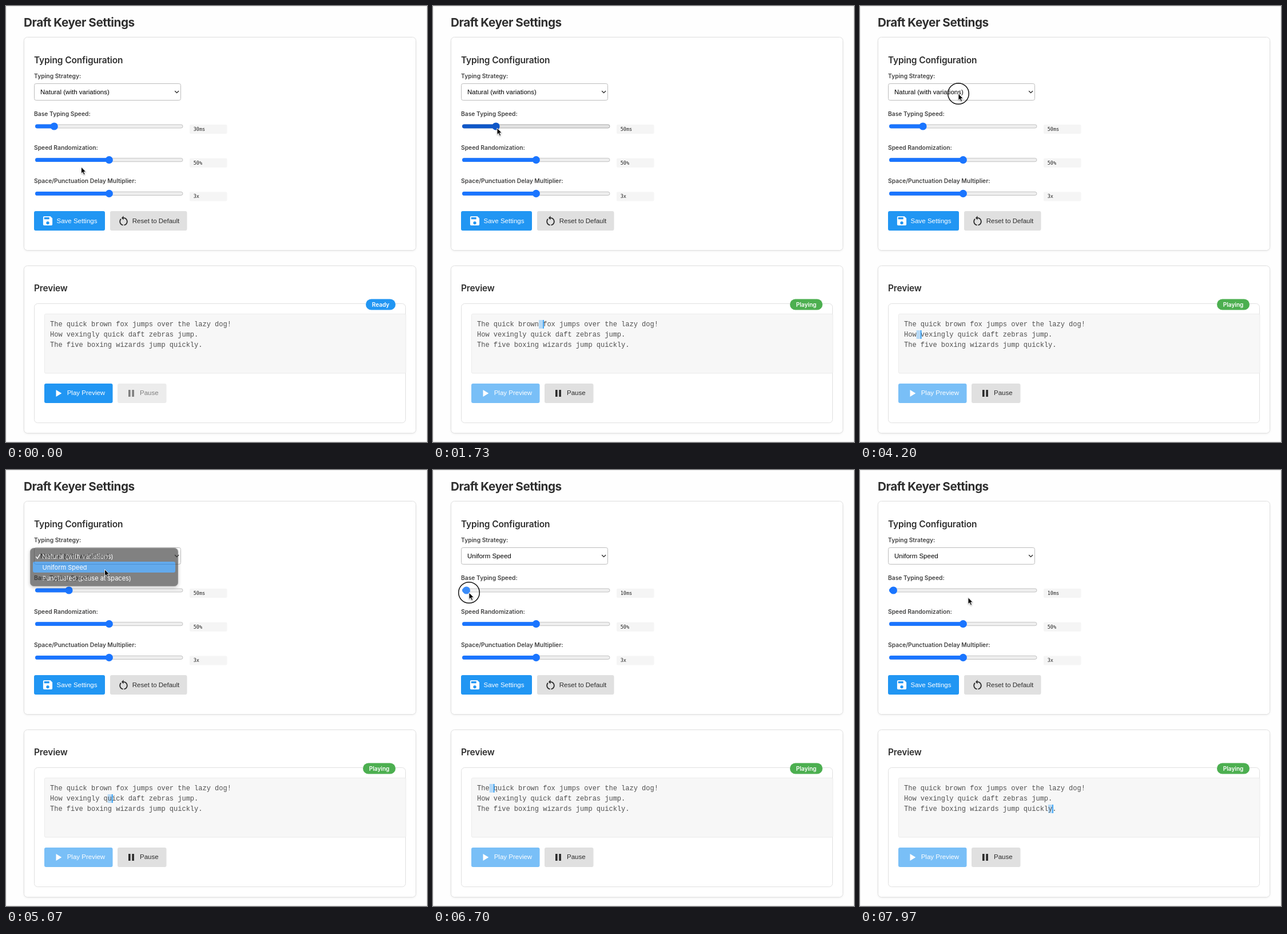
An HTML page for the animation above (8000 ms loop, 736x761 px).

```html
<!DOCTYPE html>
<html lang="en">
<head>
<meta charset="utf-8">
<title>Draft Keyer Settings</title>
<style>
html, body { margin: 0; width: 100%; height: 100%; overflow: hidden; background: #fefefe; }
svg { display: block; width: 736px; height: 761px; }
text { font-family: "Liberation Sans", Arial, sans-serif; font-size: 11.5px; white-space: pre; }
.h1, .h2, .label, .badge, .menu text { font-family: Inter, sans-serif; font-weight: 600; fill: #2f2f2f; }
.h1 { font-size: 20.7px; font-weight: 700; letter-spacing: -.45px; }
.h2 { font-size: 15.5px; letter-spacing: -.15px; }
.label { font-size: 10.3px; fill: #444; }
.badge { font-size: 10px; fill: #fff; text-anchor: middle; }
.menu text { font-size: 11px; font-weight: 400; fill: #fff; }
.value { font-family: "DejaVu Sans Mono", monospace; font-size: 8.5px; fill: #222; }
.code { font-family: "Liberation Mono", monospace; font-size: 12px; fill: #505050; }
.card { fill: #fff; stroke: #e0e0e0; }
.soft { filter: drop-shadow(0 1px 1.5px rgba(0,0,0,.07)); }
</style>
</head>
<body>
<svg viewBox="0 0 736 761">
  <rect x=".5" y=".5" width="735" height="760" fill="#fefefe" stroke="#ececec"/>
  <text class="h1" x="31" y="36">Draft Keyer Settings</text>

  <rect class="card soft" x="31.5" y="54.5" width="685" height="372" rx="6"/>
  <text class="h2" x="49" y="100">Typing Configuration</text>
  <text class="label" x="49" y="126">Typing Strategy:</text>
  <rect id="box" x="49.5" y="135.5" width="256" height="29" rx="3" fill="#fff"/>
  <text id="choice" x="60" y="154"></text>
  <path d="M295.2 148.3l3.4 3.4 3.4-3.4" fill="none" stroke="#222" stroke-width="1.3"/>
  <g id="sliders"></g>
  <rect x="49" y="358" width="124" height="34" rx="3" fill="#2196f3"/>
  <path transform="translate(62.2 364.2) scale(.9)" fill="#fff" fill-rule="evenodd"
    d="M17 3H5a2 2 0 0 0-2 2v14a2 2 0 0 0 2 2h14a2 2 0 0 0 2-2V7zM12 19a3 3 0 1 1 0-6 3 3 0 0 1 0 6zM15 9H5V5h10z"/>
  <text x="88.5" y="379" fill="#fff">Save Settings</text>
  <rect x="182" y="358" width="134.5" height="34" rx="3" fill="#e0e0e0"/>
  <path transform="translate(194.7 364.5) scale(.9)" fill="#2b2b2b"
    d="M12 5V2L8 6l4 4V7c3.31 0 6 2.69 6 6 0 2.97-2.17 5.43-5 5.91v2.02c3.95-.49 7-3.85 7-7.93 0-4.42-3.58-8-8-8zm-6 8c0-1.65.67-3.15 1.76-4.24L6.34 7.34C4.9 8.79 4 10.79 4 13c0 4.08 3.05 7.44 7 7.93v-2.02c-2.83-.48-5-2.94-5-5.91z"/>
  <text x="220.8" y="379" fill="#2b2b2b">Reset to Default</text>

  <rect class="card soft" x="31.5" y="453.5" width="685" height="292" rx="6"/>
  <text class="h2" x="49" y="498">Preview</text>
  <rect class="card" x="49.5" y="519.5" width="649" height="208" rx="6"/>
  <rect x="67.5" y="537.5" width="631.5" height="103.5" rx="2" fill="#f7f7f7" stroke="#ebebeb"/>
  <g id="mark">
    <rect y="-11" width="7.2" height="15" fill="#2196f3" opacity=".3"/>
  </g>
  <g id="code"></g>
  <rect id="caret" width="1.6" height="15" fill="#2196f3"/>
  <rect id="pill" y="511.5" height="19" rx="9.5"/>
  <text class="badge" id="state" y="524.7"></text>
  <g id="play">
    <rect x="67" y="659" width="119.5" height="34" rx="3" fill="#2196f3"/>
    <path d="M87.5 670v12l9.8-6z" fill="#fff"/>
    <text x="106.7" y="679" fill="#fff">Play Preview</text>
  </g>
  <g id="pause">
    <rect x="195" y="659" width="85.5" height="34" rx="3" fill="#e0e0e0"/>
    <path d="M214 670h3.6v12H214zM220.3 670h3.6v12h-3.6z" fill="#2b2b2b"/>
    <text x="234" y="679" fill="#2b2b2b">Pause</text>
  </g>

  <g id="menu" class="menu">
    <rect x="42.5" y="136.5" width="258" height="66" rx="6" fill="#383838" stroke="#555"
      style="filter: drop-shadow(0 2px 3px rgba(0,0,0,.35))"/>
    <rect id="pick" x="47" width="249" height="19" rx="3" fill="#0a79e2"/>
    <path d="M52.3 151.3l2.6 3.2 4.6-7.3" fill="none" stroke="#fff" stroke-width="1.4"/>
    <text x="63.5" y="155">Natural (with variations)</text>
    <text x="63.5" y="174">Uniform Speed</text>
    <text x="63.5" y="193">Punctuated (pause at spaces)</text>
  </g>

  <circle id="ring" r="18.3" fill="none" stroke="#111" stroke-width="1.5"/>
  <path id="cursor" d="M0 0V11.6L2.6 9.2 4.5 13.6 6.6 12.7 4.7 8.4H8.3Z" fill="#000" stroke="#fff" stroke-width=".9"
    style="filter: drop-shadow(0 1px 1px rgba(0,0,0,.3))"/>
</svg>
<script>
const LOOP = 8000, PITCH = 7.2;
const $ = id => document.getElementById(id);
const set = (el, attrs) => { for (const k in attrs) el.setAttribute(k, attrs[k]); };
const show = (el, on) => { el.style.display = on ? '' : 'none'; };
const put = (el, s) => { if (el.textContent !== s) el.textContent = s; };
const within = (t, a, b) => t >= a && t < b;
const step5 = v => Math.round(v / 5) * 5;

function add(parent, tag, attrs, text) {
  const el = document.createElementNS('http://www.w3.org/2000/svg', tag);
  set(el, attrs);
  if (text) el.textContent = text;
  parent.append(el);
  return el;
}

const LINES = [
  'The quick brown fox jumps over the lazy dog!',
  'How vexingly quick daft zebras jump.',
  'The five boxing wizards jump quickly.'
];
LINES.forEach((s, i) => add($('code'), 'text', { class: 'code', x: 77, y: 559 + 18 * i }, s));

function slider(label, y, thumbX, value) {
  const g = $('sliders');
  add(g, 'text', { class: 'label', x: 49, y: y - 18 }, label);
  const track = add(g, 'rect', { x: 51.5, y: y - 3, width: 257.5, height: 6, rx: 3, fill: '#efefef', stroke: '#b5b5b5', 'stroke-width': .8 });
  const bar = add(g, 'rect', { x: 51, y: y - 3.4, width: thumbX - 51, height: 6.8, rx: 3.4, fill: '#1a75ff' });
  const thumb = add(g, 'circle', { cx: thumbX, cy: y, r: 6.6, fill: '#1a75ff' });
  add(g, 'rect', { x: 321, y: y - 3, width: 65.5, height: 16, rx: 2, fill: '#f5f5f5' });
  const out = add(g, 'text', { class: 'value', x: 327.7, y: y + 8 }, value);
  return { track, bar, thumb, out };
}
const speed = slider('Base Typing Speed:', 210, 84, '30ms');
slider('Speed Randomization:', 268.7, 180.3, '50%');
slider('Space/Punctuation Delay Multiplier:', 327.4, 180.3, '3x');

// time, x, y of the pointer
const PATH = [
  [0, 131.5, 281], [30, 131.5, 281], [430, 87, 208], [590, 87, 208], [800, 112, 211], [1000, 112, 213],
  [2640, 112, 213], [2900, 128, 227], [3380, 128, 227], [3860, 163, 174], [4100, 172, 153],
  [4600, 172, 153], [4900, 172.5, 173.5], [5330, 172.5, 173.5], [5900, 109.5, 210], [6400, 109.5, 210],
  [6640, 63, 214], [6880, 63, 214], [7230, 189, 222.5], [LOOP, 189, 222.5]
];

// time, index of the character being typed
const TYPED = [
  [620, 0], [760, 0], [900, 3], [1050, 4], [1300, 9], [1450, 10], [1680, 15], [1830, 16], [2000, 19],
  [2170, 20], [2430, 25], [2600, 26], [2840, 30], [3065, 31], [3200, 34], [3330, 35], [3510, 39],
  [3650, 40], [3790, 43], [3940, 44], [3990, 45], [4160, 48], [4330, 49], [4830, 57], [4990, 58],
  [5045, 59], [5320, 63.9], [5320, 0], [6440, 21.9], [6440, 0], [6661, 0], [LOOP, 120]
];

function sample(keys, t, ease) {
  let i = 0;
  while (i < keys.length - 2 && t >= keys[i + 1][0]) i++;
  const a = keys[i], b = keys[i + 1];
  const p = ease(Math.min(1, Math.max(0, (t - a[0]) / (b[0] - a[0]))));
  return a.slice(1).map((v, k) => v + (b[k + 1] - v) * p);
}
const linear = p => p;
const smooth = p => p * p * (3 - 2 * p);

function speedAt(t, x) {
  if (t < 590) return 30;
  if (t < 1000) return step5(30 + (x - 87) / 1.25);
  if (t < 6400) return 50;
  if (t < 6640) return step5(50 + (x - 109.5) / 1.16);
  return 10;
}

function drawSpeed(t, x, y) {
  const v = speedAt(t, x), cx = 58.4 + (v - 10) * 1.29;
  const active = within(t, 570, 1410) || within(t, 6300, 6790);
  const hover = x > 50 && x < 310 && y > 202 && y < 219;
  const color = active ? '#3b8cf8' : hover ? '#0f57c8' : '#1a75ff';
  set(speed.track, { fill: hover && !active ? '#e2e2e2' : '#efefef', stroke: hover && !active ? '#999' : '#b5b5b5' });
  set(speed.bar, { width: cx - 51, fill: color });
  set(speed.thumb, { cx, fill: color });
  put(speed.out, v + 'ms');
}

function drawTyping(t) {
  const playing = t >= 620;
  let col = Math.floor(sample(TYPED, t, linear)[0] + 1e-6), row = 0;
  while (row < 2 && col > LINES[row].length) col -= LINES[row++].length + 1;
  const on = playing && col < LINES[row].length;
  const x = 77 + col * PITCH, y = 559 + row * 18;
  show($('mark'), on);
  show($('caret'), on);
  set($('mark'), { transform: `translate(${x} ${y})` });
  set($('caret'), { x: x + PITCH, y: y - 11 });
  const left = playing ? 624 : 629;
  set($('pill'), { x: left, width: 681 - left, fill: playing ? '#4caf50' : '#2196f3' });
  set($('state'), { x: (left + 681) / 2 });
  put($('state'), playing ? 'Playing' : 'Ready');
  set($('play'), { opacity: playing ? .6 : 1 });
  set($('pause'), { opacity: playing ? 1 : .6 });
}

function drawSelect(t, y) {
  const focus = within(t, 5320, 6300);
  put($('choice'), t < 5320 ? 'Natural (with variations)' : 'Uniform Speed');
  set($('box'), { stroke: focus ? '#1a5dbb' : '#bdbdbd', 'stroke-width': focus ? 2 : 1 });
  show($('menu'), within(t, 4230, 5200));
  set($('menu'), { opacity: Math.min(1, Math.max(0, (5200 - t) / 200)) * .98 });
  set($('pick'), { y: y < 160 ? 141 : 160 });
}

function draw(t) {
  const [x, y] = sample(PATH, t, smooth);
  drawSpeed(t, x, y);
  drawTyping(t);
  drawSelect(t, y);
  show($('ring'), within(t, 570, 1300) || within(t, 4130, 4230) || within(t, 6300, 6790));
  set($('ring'), { cx: x, cy: y });
  set($('cursor'), { transform: `translate(${x} ${y})` });
}

const start = performance.now();
function tick() {
  draw((performance.now() - start) % LOOP);
  requestAnimationFrame(tick);
}
draw(0);
requestAnimationFrame(tick);
</script>
</body>
</html>
```
